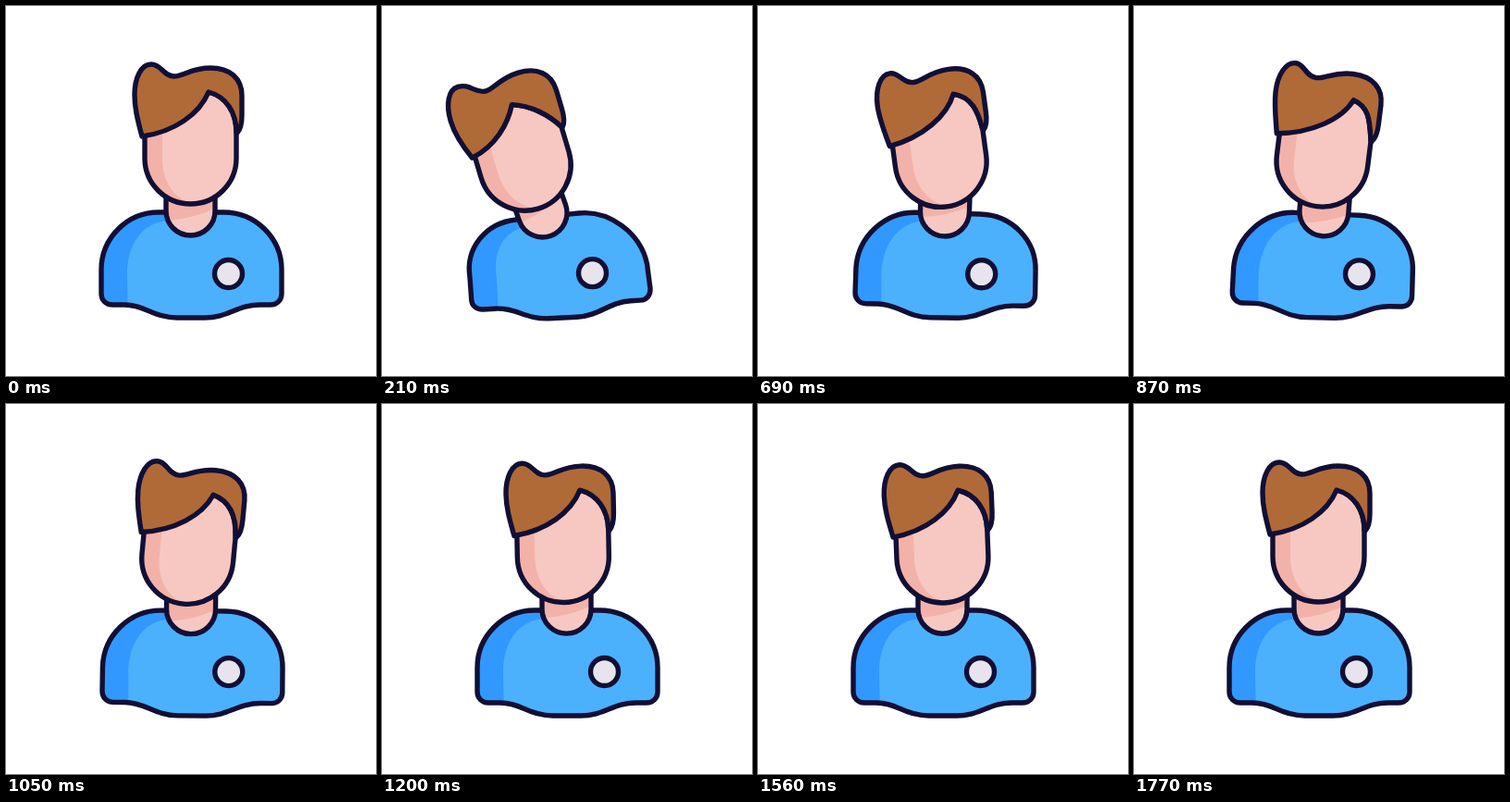
An HTML page with a canvas for the animation above (3.8 s loop, 400x400 px).

```html
<!DOCTYPE html>
<html lang="en">
<head>
<meta charset="utf-8">
<title>Swaying person</title>
<style>
  html, body { margin: 0; width: 100%; height: 100%; overflow: hidden; background: #fff; }
  canvas { display: block; width: 400px; height: 400px; }
</style>
</head>
<body>
<canvas id="stage"></canvas>
<script>
const LOOP = 3800, STEP = 30;
const INK = '#120f35', HAIR = '#b06a38', SKIN = '#f7c8c1', SKIN_SHADE = '#f3b2a9';
const SHIRT = '#4bb1fd', SHIRT_SHADE = '#3198ff', BADGE = '#e8e4ee';

const BODY = `M172 223 L165 223 C131 223 103 251 103 285 L103 311
  C103 318 108 323 115 323 L128 323 C150 323 160 337 185 337 L215 337
  C240 337 250 323 275 323 L286 323 C293 323 298 318 298 311 L298 285
  C298 251 270 223 235 223 L226 223 Z`;
const BODY_SHADE = 'M132 340 L131 290 C131 258 147 234 175 232 L175 210 L80 210 L80 340 Z';

// Neck and head are drawn around the centres of their round ends
const neck = new Path2D('M-26.5 -20 V0 A26.5 26.5 0 0 0 26.5 0 V-20');
const neckShade = new Path2D('M-40 -50 V12 L-22 10 Q8 8 40 -9 V-50 Z');
const faceShade = new Path2D('M-60 -80 H-30.5 V0 C-30.5 25 -18 44 2 49 L-60 60 Z');

const canvas = document.getElementById('stage');
const ctx = canvas.getContext('2d');
const ratio = window.devicePixelRatio || 1;
canvas.width = canvas.height = 400 * ratio;

// Tip over from rest, hold, then swing back through the later [time, value] turning points
function sway(t, reached, amount, released, ...turns) {
  let from = [0, 0];
  for (const to of [[reached, amount], [released, amount], ...turns]) {
    if (t < to[0]) {
      const u = (t - from[0]) / (to[0] - from[0]);
      return from[1] + (to[1] - from[1]) * (1 - Math.cos(Math.PI * u)) / 2;
    }
    from = to;
  }
  return from[1];
}

// Bend a path towards the leaning side, its top moving most; the other side mirrors it
function bend(path, lean) {
  const side = Math.sign(lean);
  return new Path2D(path.replace(/([\d.]+) ([\d.]+)/g, (_, x, y) => {
    const u = side * (x - 200.5) / 100, v = (337 - y) / 100;
    const dx = -lean * (5 + 15 * v * v + 2.5 * u * u + 4 * u * v);
    const dy = Math.abs(lean) * (4 * v * v - u * (6 + 5 * v));
    return `${+x + dx} ${+y + dy}`;
  }));
}

// The fringe slides sideways and sinks a little as the body leans
function headPaths(lean) {
  const slide = 17 * lean, sink = 6 * Math.abs(lean), tuft = 3.5 * lean;
  const parting = `C${49.5 - 1.8 * sink} ${-49.5 + sink} ${38.5 - slide} ${-66.5 + 1.3 * sink}
    ${19.5 - slide} ${-71.5 + sink}`;
  return {
    face: new Path2D(`M-49.5 -25 V0 A49.5 49.5 0 0 0 49.5 0 V-28 ${parting} Z`),
    hair: new Path2D(`M-52.5 -23.5 C${-57.5 - tuft} -42.5 ${-60.5 - tuft} -54.5 ${-60.5 - tuft} -68.5
      C${-60.5 - tuft} -86.5 ${-53.5 - tuft} -101.5 ${-42.5 - tuft} -101.5
      C-31.5 -101.5 -29.5 -88.5 -17.5 -88.5 C-7.5 -88.5 .5 -97.5 21.5 -97.5
      C42.5 -97.5 55.5 -86.5 55.5 -67.5 V-46.5 C55.5 -36.5 53.5 -30.5 50.5 -27.5 L49.5 -28 ${parting}
      C${9.5 - slide} -47.5 ${-17.5 - slide / 2} -28.5 -52.5 -23.5 Z`)
  };
}

function paint(shape, fill, shade, shadeFill, shadeY = 0) {
  ctx.fillStyle = fill;
  ctx.fill(shape);
  if (shade) {
    ctx.save();
    ctx.clip(shape);
    ctx.translate(0, shadeY);
    ctx.fillStyle = shadeFill;
    ctx.fill(shade);
    ctx.restore();
  }
  ctx.stroke(shape);
}

function placed(x, y, degrees, draw) {
  ctx.save();
  ctx.translate(x, y);
  ctx.rotate(degrees * Math.PI / 180);
  draw();
  ctx.restore();
}

function render(t) {
  const lean = sway(t, 280, 1, 430, [770, -.4], [1200, 0]);
  const neckX = sway(t, 280, -30.5, 430, [770, 7.4], [1110, 0]);
  const headX = sway(t, 290, -54.5, 430, [770, 6], [1110, -4], [1600, 0]);
  const headAngle = sway(t, 330, -23.5, 460, [920, 8], [1350, -4.5], [1770, 0]);
  const headY = .43 * Math.abs(headAngle);

  ctx.setTransform(ratio, 0, 0, ratio, 0, 0);
  ctx.fillStyle = '#fff';
  ctx.fillRect(0, 0, 400, 400);
  ctx.strokeStyle = INK;
  ctx.lineWidth = 5.4;
  ctx.lineCap = ctx.lineJoin = 'round';

  paint(bend(BODY, lean), SHIRT, bend(BODY_SHADE, lean), SHIRT_SHADE);

  const badge = new Path2D();
  badge.arc(240.5 + neckX / 2, 289.5 - lean, 15, 0, 2 * Math.PI);
  paint(badge, BADGE);

  placed(199.5 + neckX, 221.5 + headY * .28, neckX * .75, () =>
    paint(neck, SKIN, neckShade, SKIN_SHADE, headAngle / 2));

  const { face, hair } = headPaths(lean);
  placed(199.5 + headX, 164.5 + headY, headAngle, () => {
    paint(face, SKIN, faceShade, SKIN_SHADE);
    paint(hair, HAIR);
  });
}

const start = performance.now();
function tick() {
  const t = (performance.now() - start) % LOOP;
  render(Math.floor(t / STEP) * STEP);
  requestAnimationFrame(tick);
}
tick();
</script>
</body>
</html>
```
